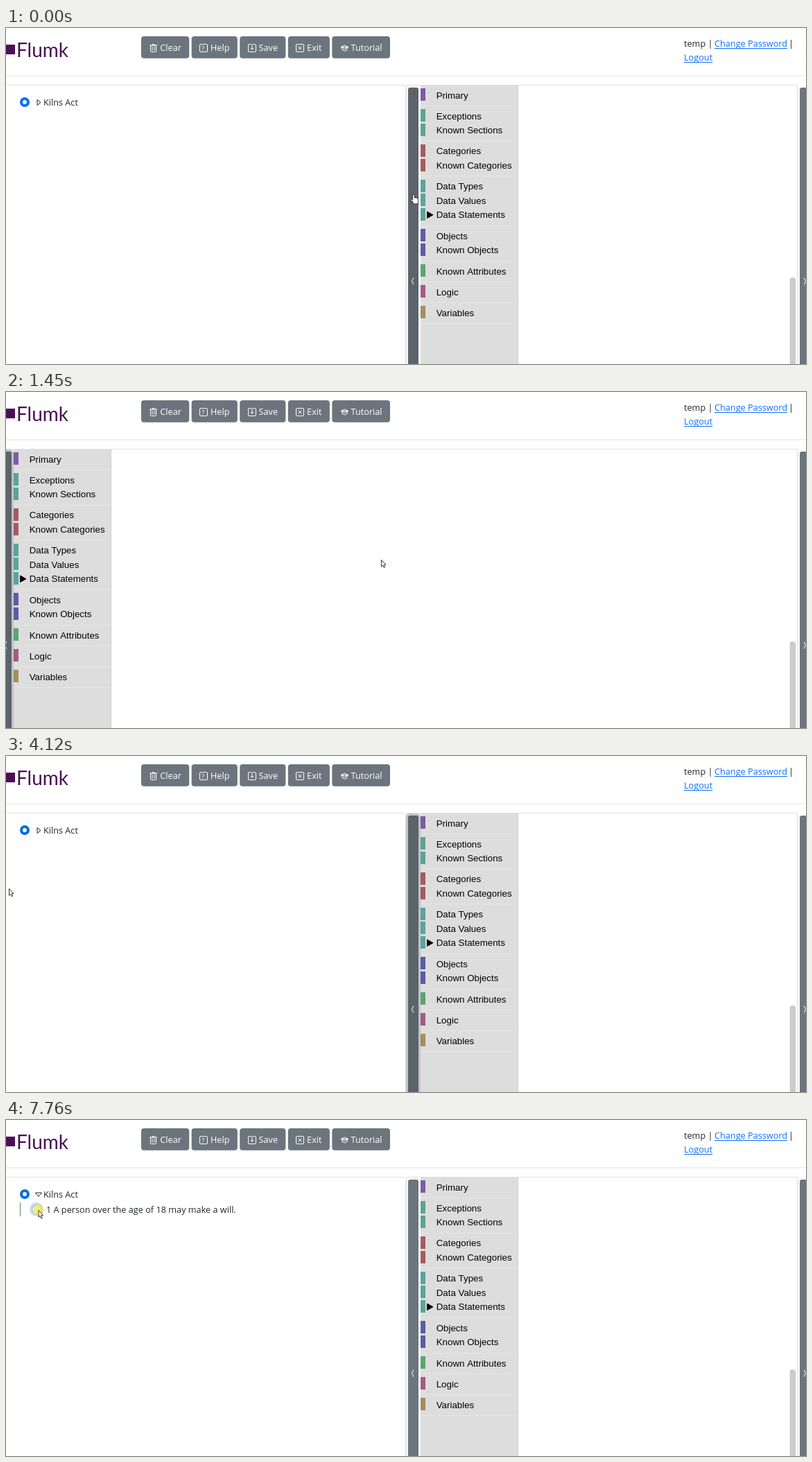
An HTML page with a canvas for the animation above (8 s loop, 1154 px wide and 485 px high).

```html
<!DOCTYPE html>
<html lang="en">
<head>
<meta charset="utf-8">
<title>Editor panels</title>
<style>
html, body { margin: 0; width: 100%; height: 100%; overflow: hidden; background: #fff; }
canvas { display: block; }
</style>
</head>
<body>
<canvas id="stage" width="1154" height="485"></canvas>
<script>
const ctx = document.getElementById('stage').getContext('2d');
const W = 1154, H = 485, LOOP = 8000, STEP = 68;
const UI = '12.7px "Open Sans", "Noto Sans", sans-serif';
const LABEL = '13.33px "Liberation Sans", Arial, sans-serif';
const GREY = '#6c757d', DARK = '#5c636a', INK = '#212529', BLUE = '#0d6efd', LINE = '#dcdee0';

const MOVES = [
  { from: 1450, to: 1800, x: 159, y: 256 },
  { from: 2260, to: 3030, x: 4, y: 191 },
  { from: 4660, to: 5420, x: 50, y: 107 },
  { from: 6160, to: 6720, x: 43, y: 104 },
  { from: 6860, to: 7280, x: 46.5, y: 130 }
];
const CLOSE = { from: 500, to: 710 };
const OPEN = { from: 3500, to: 3850 };
const EXPAND = { from: 5690, to: 6160 };
const CHOOSE = { from: 7760, to: LOOP };
const PRESSES = [CLOSE, OPEN, EXPAND, CHOOSE];
const STARTS = [...MOVES, ...PRESSES].map(a => a.from).sort((a, b) => a - b);

const GROUPS = [
  { hue: 268, items: ['Primary'] },
  { hue: 166, items: ['Exceptions', 'Known Sections'] },
  { hue: 356, items: ['Categories', 'Known Categories'] },
  { hue: 174, items: ['Data Types', 'Data Values', 'Data Statements'] },
  { hue: 242, items: ['Objects', 'Known Objects'] },
  { hue: 138, items: ['Known Attributes'] },
  { hue: 328, items: ['Logic'] },
  { hue: 42, items: ['Variables'] }
];
const BUTTONS = { Clear: trashIcon, Help: helpIcon, Save: saveIcon, Exit: exitIcon, Tutorial: capIcon };

function text(str, x, y, font, color) {
  ctx.font = font;
  ctx.fillStyle = color;
  ctx.fillText(str, x, y);
  return ctx.measureText(str).width;
}

function rect(x, y, w, h, color, radius = 0) {
  ctx.fillStyle = color;
  ctx.beginPath();
  ctx.roundRect(x, y, w, h, radius);
  ctx.fill();
}

function frame(x, y, w, h, color, radius) {
  ctx.strokeStyle = color;
  ctx.lineWidth = 1;
  ctx.beginPath();
  ctx.roundRect(x, y, w, h, radius);
  ctx.stroke();
}

function disc(x, y, r, color) {
  rect(x - r, y - r, 2 * r, 2 * r, color, r);
}

function line(points, color = '#fff', fill = null) {
  ctx.beginPath();
  for (let i = 0; i < points.length; i += 2) ctx.lineTo(points[i], points[i + 1]);
  if (fill) {
    ctx.closePath();
    ctx.fillStyle = fill;
    ctx.fill();
  }
  ctx.strokeStyle = color;
  ctx.lineWidth = 1;
  ctx.stroke();
}

function at(x, y, paint) {
  ctx.save();
  ctx.translate(x, y);
  paint();
  ctx.restore();
}

function box() {
  frame(0.5, 0.5, 11, 11, '#fff', 1.5);
}

function trashIcon() {
  frame(1.5, 2, 8, 9.5, '#fff', 1);
  line([0, 2, 11, 2]);
  line([4, 0.5, 7, 0.5]);
  for (const x of [4, 7]) line([x, 4, x, 9.5]);
}

function helpIcon() {
  box();
  text('?', 3.3, 9.5, '9.5px "Open Sans", sans-serif', '#fff');
}

function saveIcon() {
  box();
  rect(4.5, 0, 3, 1, GREY);
  line([6, 0, 6, 8]);
  line([3.5, 5.8, 6, 8.3, 8.5, 5.8]);
}

function exitIcon() {
  box();
  line([3.5, 3.5, 8.5, 8.5]);
  line([8.5, 3.5, 3.5, 8.5]);
}

function capIcon() {
  line([1, 4.5, 6.5, 2, 12, 4.5, 6.5, 7, 1, 4.5, 12, 4.5]);
  line([3, 5.5, 3, 8.5, 6.5, 10, 10, 8.5, 10, 5.5]);
}

function chevron(x, dir) {
  line([x + dir, 360.5, x - dir, 365.5, x + dir, 370.5]);
}

function link(str, x, y) {
  const width = text(str, x, y, UI, BLUE);
  rect(x, y + 2, width, 1, BLUE);
}

function header() {
  rect(0, 24, 13, 14, '#4b0f55');
  text('Flumk', 15, 42, '28px Lato, sans-serif', '#4b0f55');
  let x = 195;
  for (const [label, icon] of Object.entries(BUTTONS)) {
    ctx.font = UI;
    const width = ctx.measureText(label).width + 38.7;
    rect(x, 12, width, 31.7, GREY, 4);
    text(label, x + 27.3, 33, UI, '#fff');
    at(Math.round(x + 11.5), 23, icon);
    x += width + 3.4;
  }
  text('temp |', 978, 27, UI, INK);
  link('Change Password', 1022, 27);
  text('|', 1129, 27, UI, INK);
  link('Logout', 978, 47);
  rect(0, 68.5, W, 1, '#e3e4e6');
}

function outline(s, gutter) {
  const edge = gutter - 3;
  if (edge <= 0) return;
  ctx.save();
  ctx.beginPath();
  ctx.rect(0, 82, edge, H);
  ctx.clip();
  frame(-20, 82.5, edge + 19.5, H, LINE, 4);

  disc(27, 107, 7, s >= OPEN.from ? '#0b6dd8' : BLUE);
  disc(27, 107, 2.9, '#fff');
  text('Kilns Act', 54, 112, UI, INK);
  if (s < EXPAND.to) {
    line([45, 103.5, 50, 107.5, 45, 111.5], INK, '#fff');
  } else {
    const chosen = s >= CHOOSE.from;
    line([42.5, 105, 51.5, 105, 47, 110.5], INK, '#fff');
    rect(20, 119, 1, 20, '#777');
    if (chosen) disc(44, 129, 10, '#c2dbfe');
    disc(44, 129, 6.7, chosen ? '#86b7fe' : '#bfbfbf');
    disc(44, 129, 5.8, '#fff');
    text('1 A person over the age of 18 may make a will.', 58, 134, UI, INK);
  }
  ctx.restore();
}

function toolbox(x) {
  frame(x - 20, 82.5, 1161.5 - x, H, LINE, 0);
  rect(x, 83, 141, H, '#ddd');
  rect(x + 140, 83, 1, H, '#cfcfcf');
  let y = 97;
  for (const { hue, items } of GROUPS) {
    for (const label of items) {
      rect(x, Math.round(y - 10), 7, 18, `hsl(${hue} 29% 50%)`);
      text(label, x + 22.7, Math.round(y + 4.5), LABEL, '#000');
      y += 20.6;
    }
    rect(x, Math.round(y - 5.8), 140, 1, '#e5e5e5');
    y += 9.6;
  }
  line([x + 9.5, 265, x + 18, 269.8, x + 9.5, 274.5], '#000', '#000');
}

function gutterBar(s, x) {
  const used = s < EXPAND.from;
  if (used && s >= CLOSE.from) rect(x - 3, 83, 21, H, '#c0c4c8', 5);
  rect(x, 86, 15, H, used ? DARK : GREY, 3);
  chevron(x + 6.7, 1.3);
}

function rightSide() {
  rect(1130.7, 360, 8.5, H, '#cbcbcb', 4);
  rect(1145, 86, 15, H, GREY, 3);
  chevron(1152.3, -1.3);
}

// CSS "ease": cubic-bezier(.25, .1, .25, 1)
function ease(t) {
  if (t <= 0) return 0;
  if (t >= 1) return 1;
  let lo = 0, hi = 1, u, v;
  for (let i = 0; i < 24; i++) {
    u = (lo + hi) / 2;
    v = 1 - u;
    if (0.75 * u * v + u ** 3 < t) lo = u; else hi = u;
  }
  return 0.3 * u * v * v + 3 * u * u * v + u ** 3;
}

function gutterAt(s) {
  const closed = ease((s - 724) / 350) - ease((s - 3887.8) / 228);
  return Math.round(580 - 587 * closed);
}

function pointerAt(s) {
  let x = 588, y = 240;
  for (const m of MOVES) {
    if (s < m.from) break;
    const begin = m.from - 43;
    const k = ease((s - begin) / (m.to - begin));
    x += (m.x - x) * k;
    y += (m.y - y) * k;
  }
  return [x, y];
}

function arrow() {
  line([0.5, 0.5, 0.5, 10.3, 2.6, 8.3, 4.2, 11.8, 5.8, 11.1, 4.3, 7.7, 7, 7.4], '#333', '#fff');
}

function hand() {
  const parts = grow => {
    const color = grow ? '#222' : '#fff';
    const part = (x, y, w, h, r) =>
      rect(x - grow, y - grow, w + 2 * grow, h + 2 * grow, color, r + grow);
    part(-0.8, 0.8, 1.8, 9, 0.9);
    part(-0.8, 5.5, 7, 8, 2);
    part(-3.2, 7.7, 4, 2.4, 1.2);
  };
  parts(0.8);
  parts(0);
}

function pointer(s, gutter) {
  const [x, y] = pointerAt(s);
  const pressed = PRESSES.some(p => s >= p.from && s < p.to);
  if (pressed) disc(x, y, 8, 'rgba(240, 234, 70, 0.75)');
  at(x, y, x >= gutter && x <= gutter + 15 ? hand : arrow);
}

// The screen refreshes every STEP ms, counted from the latest action.
function snap(t) {
  const start = STARTS.filter(a => a <= t).pop() || 0;
  return start + Math.floor((t - start) / STEP) * STEP;
}

function draw(t) {
  const s = snap(t), gutter = gutterAt(s);
  rect(0, 0, W, H, '#fff');
  header();
  outline(s, gutter);
  toolbox(gutter + 18);
  gutterBar(s, gutter);
  rightSide();
  pointer(s, gutter);
}

const begin = performance.now();
function tick() {
  draw((performance.now() - begin) % LOOP);
  requestAnimationFrame(tick);
}
tick();
</script>
</body>
</html>
```
